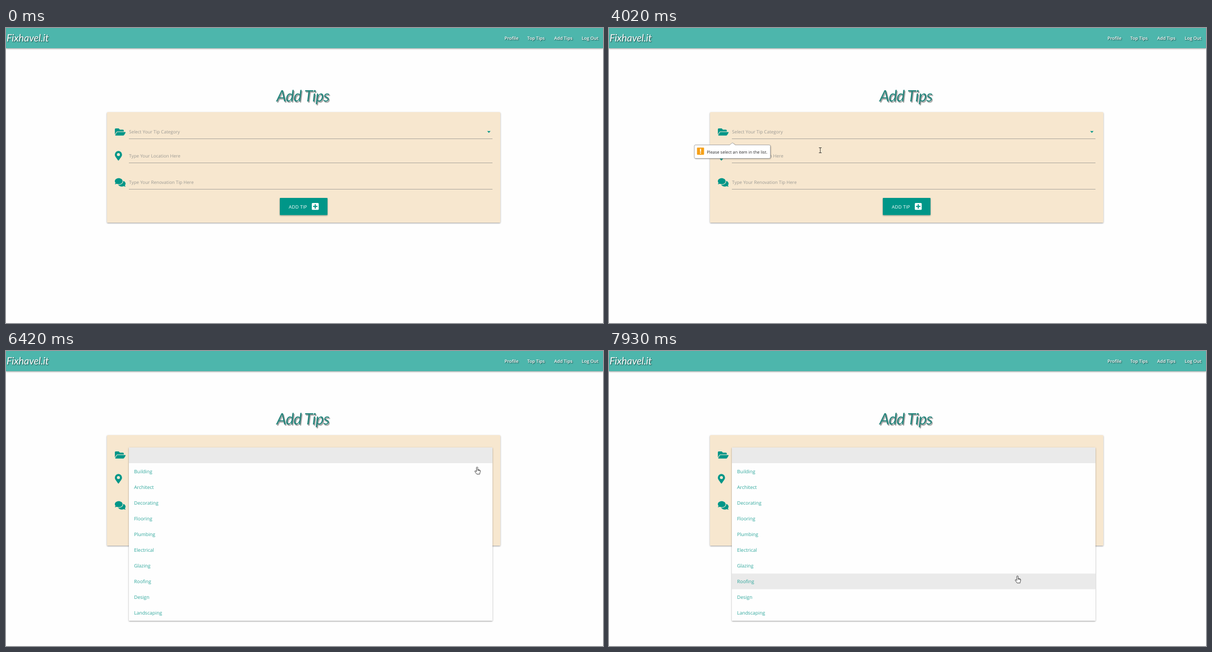
Write an HTML page with a canvas that moves like this. It is 1064x526 px and loops after 8 s.

```html
<!DOCTYPE html>
<html lang="en">
<head>
<meta charset="utf-8">
<title>Add Tips</title>
<style>
html, body { margin: 0; width: 100%; height: 100%; overflow: hidden; background: #fefefe; }
canvas { display: block; }
</style>
</head>
<body>
<canvas id="stage" width="1064" height="526"></canvas>
<script>
const ctx = document.getElementById('stage').getContext('2d');
const LOOP = 8000;
const SANS = '"Open Sans", "Noto Sans", sans-serif';
const SCRIPT = 'Lato, "Open Sans", sans-serif';
const TEAL = '#009688';
const MENU = { x: 219, y: 172, w: 648, h: 309, row: 309 / 11, open: 5672, time: 165 };
const TRADES = ['Building', 'Architect', 'Decorating', 'Flooring', 'Plumbing',
  'Electrical', 'Glazing', 'Roofing', 'Design', 'Landscaping'];

// Bursts of change: start, end, number of steps
const BURSTS = [
  [260, 680, 7], [1020, 1560, 9], [1830, 2300, 8], [2700, 3460, 12],
  [3530, 4300, 12], [4360, 5140, 12], [5210, 5340, 2], [5610, 5880, 5],
  [6210, 6970, 12], [7030, 7790, 12], [7860, 7930, 2]
];

// Pointer path: time, x, y
const PATH = [
  [260, 848, 479], [680, 677, 429], [950, 677, 429], [1560, 404, 270],
  [1760, 404, 270], [2300, 526, 320], [2630, 526, 320], [3460, 520, 306],
  [4020, 376.5, 218], [4300, 317, 188], [4720, 580, 173], [5140, 846, 177],
  [5340, 857, 179], [6140, 857, 179], [6970, 805, 261], [7300, 777, 317],
  [7790, 736, 393], [7930, 728, 400.5]
];

const ICONS = {
  folder: new Path2D('M572.7 292.1L500.3 416.2A64 64 0 0 1 445 448H45c-18.5 0-30-20-20.7-36.1l72.4-124.1A64 64 0 0 1 152 256h400c18.5 0 30 20 20.7 36.1zM152 224h328v-48c0-26.5-21.5-48-48-48H272l-64-64H48C21.5 64 0 85.5 0 112v278l69-118.4C86.2 242.2 118 224 152 224z'),
  pin: new Path2D('M172.3 501.7C27 291 0 269.4 0 192a192 192 0 0 1 384 0c0 77.4-27 99-172.3 309.7-9.5 13.7-29.9 13.7-39.4 0zM192 272a80 80 0 1 0 0-160 80 80 0 0 0 0 160z'),
  chat: new Path2D('M416 192c0-88.4-93.1-160-208-160S0 103.6 0 192c0 34.3 14.1 65.9 38 92-13.4 30.2-35.5 54.2-35.8 54.5-5 5-2 13.5 5.8 13.5 36.6 0 66.9-12.3 88.7-25 32.2 15.7 70.3 25 111.3 25 114.9 0 208-71.6 208-160zm122 220c23.9-26 38-57.7 38-92 0-66.9-53.5-124.2-129.3-148.1.9 6.6 1.3 13.3 1.3 20.1 0 105.9-107.7 192-240 192-10.8 0-21.3-.8-31.7-1.9C207.8 439.6 281.8 480 368 480c41 0 79.1-9.2 111.3-25 21.8 12.7 52.1 25 88.7 25 7.8 0 11-8 5.8-13.5-.3-.2-22.4-24.2-35.8-54.5z')
};
const HAND = new Path2D('M-1.2 1.2Q0 -.6 1.2 1.2V5L4.6 5.8Q6 6.3 5.8 8L5 11L4.6 13.2H-.6L-3.8 8.8Q-4.4 7 -2.8 7.2L-1.2 8.8Z');
const ARROW = new Path2D('M0 0V10L2.3 7.9L3.8 11L5 10.4L3.6 7.4L6.8 7.2Z');
const BEAM = new Path2D('M-2.5 -4.5H2.5M0 -4.5V4.5M-2.5 4.5H2.5');
const BUBBLE = new Path2D('M154 208.5H215L220 204.5L225 208.5H285.5Q287.5 208.5 287.5 210.5V230.5Q287.5 232.5 285.5 232.5H154Q152 232.5 152 230.5V210.5Q152 208.5 154 208.5Z');

const clamp = v => Math.max(0, Math.min(1, v));

function shadow(dx, dy, blur, color) {
  ctx.shadowOffsetX = dx;
  ctx.shadowOffsetY = dy;
  ctx.shadowBlur = blur;
  ctx.shadowColor = color;
}

function clearShadow() {
  shadow(0, 0, 0, 'transparent');
}

function rect(x, y, w, h, color, r = 0) {
  ctx.fillStyle = color;
  ctx.beginPath();
  ctx.roundRect(x, y, w, h, r);
  ctx.fill();
}

// The shadow shows only outside the box, so translucent boxes stay clear
function raised(x, y, w, h, color, r, dy, blur) {
  ctx.save();
  ctx.beginPath();
  ctx.rect(x - 20, y - 20, w + 40, h + 40);
  ctx.roundRect(x, y, w, h, r);
  ctx.clip('evenodd');
  shadow(0, dy, blur, 'rgba(0,0,0,.4)');
  rect(x, y, w, h, color, r);
  ctx.restore();
  rect(x, y, w, h, color, r);
}

function text(str, x, y, size, color, spacing = '0px', family = SANS, style = '') {
  ctx.font = `${style} ${size}px ${family}`;
  ctx.letterSpacing = spacing;
  ctx.fillStyle = color;
  ctx.fillText(str, x, y);
}

function icon(shape, x, y) {
  ctx.save();
  ctx.translate(x, y);
  ctx.scale(0.0332, 0.0332);
  ctx.fillStyle = TEAL;
  ctx.fill(shape, 'evenodd');
  ctx.restore();
}

// Time of the latest step in the current burst
function stepTime(t) {
  const burst = BURSTS.findLast(b => b[0] <= t);
  if (!burst) return 0;
  const [start, end, n] = burst;
  const gap = (end - start) / (n - 1);
  return start + Math.min(n - 1, Math.floor((t - start) / gap + 0.2)) * gap;
}

function pointerAt(t) {
  const i = PATH.findIndex(k => k[0] > t);
  if (i < 0) return PATH.at(-1).slice(1);
  if (i === 0) return PATH[0].slice(1);
  const [a, b] = [PATH[i - 1], PATH[i]];
  const p = (t - a[0]) / (b[0] - a[0]);
  return [a[1] + (b[1] - a[1]) * p, a[2] + (b[2] - a[2]) * p];
}

const onButton = (x, y) => x > 488 && x < 573 && y > 303 && y < 334;

function drawHeader() {
  raised(0, -4, 1064, 40, '#4db6ac', 0, 1, 2.5);
  shadow(1, 1, 1.5, 'rgba(0,0,0,.6)');
  text('Fixhavel.it', 1, 24, 18, '#fff', '-0.1px', SCRIPT, 'italic');
  const links = [['Profile', 888.5], ['Top Tips', 929], ['Add Tips', 977], ['Log Out', 1026]];
  for (const [label, x] of links) text(label, x, 21.4, 7.9, '#fff', '0px', SANS, '600');
  clearShadow();
}

function drawField(shape, iconY, label, y) {
  icon(shape, 194, iconY);
  text(label, 219.3, y - 9.2, 8.05, '#9c9a94');
  rect(219, y, 648, 1, '#b0aba0');
}

function drawForm(hover) {
  shadow(1.5, 1.5, 1, 'rgba(110,110,110,.7)');
  text('Add Tips', 482, 131, 28, '#26857c', '-0.8px', SCRIPT, 'italic');
  clearShadow();

  raised(180, 150, 701, 197, '#f7e7cf', 1.5, 1, 2.5);
  drawField(ICONS.folder, 177, 'Select Your Tip Category', 197);
  drawField(ICONS.pin, 219.3, 'Type Your Location Here', 240);
  drawField(ICONS.chat, 266.8, 'Type Your Renovation Tip Here', 287);

  ctx.fillStyle = TEAL;
  ctx.fill(new Path2D('M857.5 183.8H863.7L860.6 187Z'));

  raised(488, 303, 85, 30.5, TEAL, 1, hover ? 1.5 : 1, hover ? 3.5 : 2.5);
  text('ADD TIP', 504, 321.5, 8.2, '#fff', '0.25px');
  rect(545, 312, 12.3, 12.3, '#fff', 1.5);
  rect(547.2, 317.2, 7.9, 1.9, TEAL);
  rect(550.2, 314.2, 1.9, 7.9, TEAL);
}

function drawTooltip(alpha) {
  if (alpha <= 0) return;
  ctx.save();
  ctx.globalAlpha = alpha;
  shadow(1, 1, 2, 'rgba(0,0,0,.35)');
  ctx.fillStyle = '#fff';
  ctx.fill(BUBBLE);
  clearShadow();
  ctx.strokeStyle = '#9b9b9b';
  ctx.lineWidth = 0.8;
  ctx.stroke(BUBBLE);
  rect(156.8, 213.3, 12.6, 12.6, '#f5a019', 1);
  rect(162.2, 215.3, 1.9, 5.6, '#fff');
  rect(162.2, 222, 1.9, 1.9, '#fff');
  text('Please select an item in the list.', 174.3, 223.6, 7.45, '#2a2a2a');
  ctx.restore();
}

function drawMenu(t) {
  const p = clamp((t - MENU.open) / MENU.time);
  if (p === 0) return;
  const scale = 0.3 + 0.7 * (1 - (1 - p) ** 5);
  const alpha = 1 - (1 - p) ** 2;
  // The highlight trails the pointer by one step
  const hoverRow = Math.floor((pointerAt(t - 69)[1] - MENU.y) / MENU.row);

  ctx.save();
  ctx.translate(MENU.x, MENU.y);
  ctx.scale(scale, scale);
  ctx.globalAlpha = alpha;
  raised(0, 0, MENU.w, MENU.h, '#fefefe', 1, 1, 2.5);
  ctx.globalAlpha = alpha * p;
  rect(0, 0, MENU.w, MENU.row, '#eaeaea');
  ctx.globalAlpha = alpha;
  if (hoverRow > 0) rect(0, hoverRow * MENU.row, MENU.w, MENU.row, '#eaeaea');
  TRADES.forEach((name, i) => text(name, 9.2, (i + 1.5) * MENU.row + 3.5, 8.55, '#2fa79c'));
  ctx.restore();
}

function pointerKind(x, y, t) {
  if (t > MENU.open || onButton(x, y)) return 'hand';
  if (x < 219 || x > 867) return 'arrow';
  if (y > 172 && y < 198) return 'hand';
  if ((y > 215 && y < 241) || (y > 263 && y < 288)) return 'beam';
  return 'arrow';
}

function drawPointer(x, y, t) {
  const kind = pointerKind(x, y, t);
  ctx.save();
  ctx.translate(x, y);
  ctx.lineJoin = 'round';
  ctx.strokeStyle = '#222';
  ctx.lineWidth = 0.8;
  if (kind === 'beam') {
    ctx.stroke(BEAM);
  } else {
    const shape = kind === 'hand' ? HAND : ARROW;
    ctx.fillStyle = '#fff';
    ctx.fill(shape);
    ctx.stroke(shape);
    if (kind === 'hand') ctx.stroke(new Path2D('M1.2 5V7.2M2.9 5.4V7.4M4.5 5.9V7.6'));
  }
  ctx.restore();
}

function draw() {
  const t = stepTime(performance.now() % LOOP);
  const [x, y] = pointerAt(t);
  const tip = t < 5600 ? clamp((t - 2650) / 150) : clamp((5650 - t) / 100);

  ctx.fillStyle = '#fefefe';
  ctx.fillRect(0, 0, 1064, 526);
  ctx.textRendering = 'geometricPrecision';
  drawHeader();
  drawForm(t > 260 && t < MENU.open && onButton(x, y));
  drawTooltip(tip);
  drawMenu(t);
  if (t >= 260) drawPointer(x, y, t);
  requestAnimationFrame(draw);
}

draw();
</script>
</body>
</html>
```
